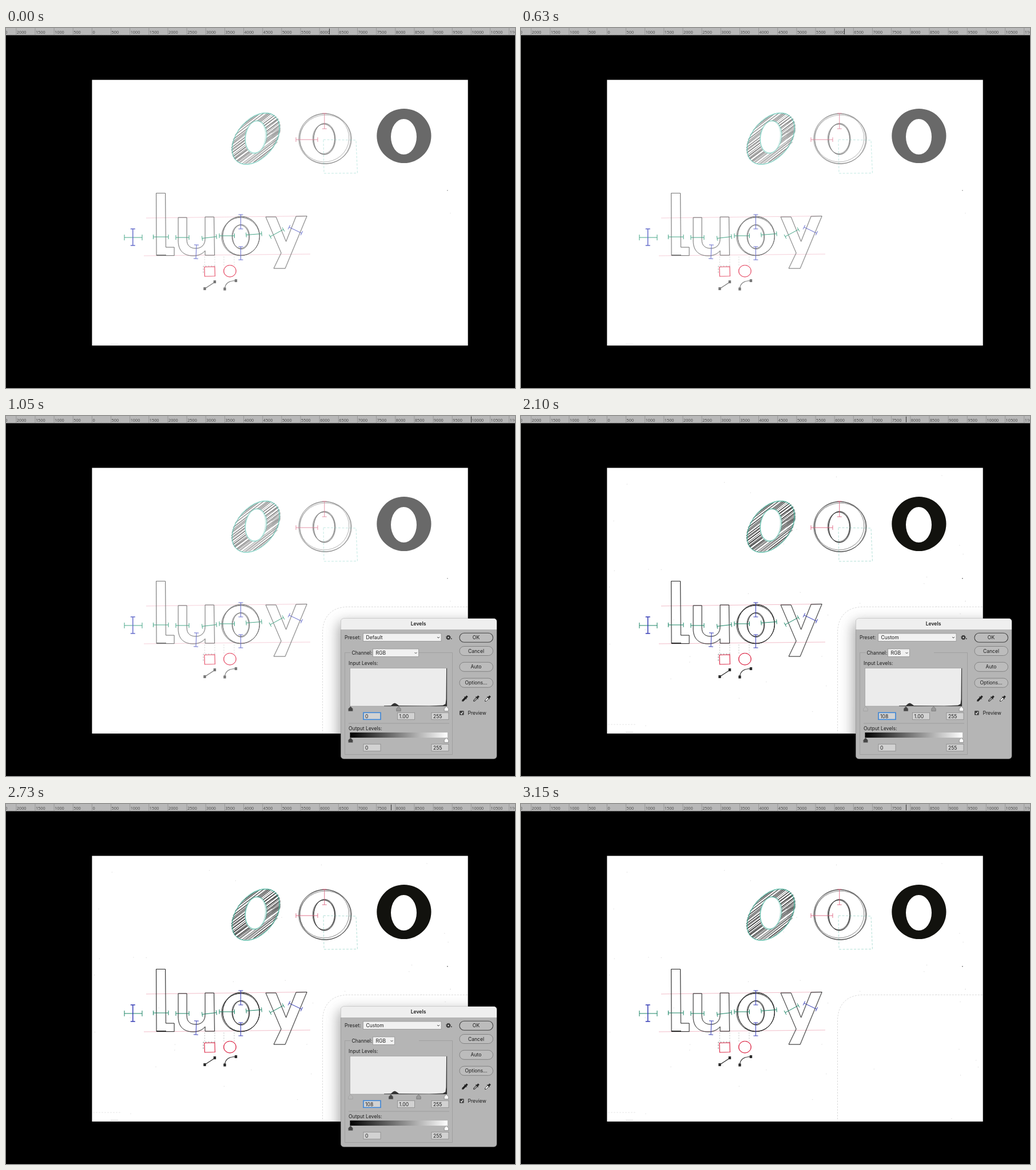
An HTML page for the animation above (4.2 s loop, 890x629 px).

```html
<!DOCTYPE html>
<html lang="en">
<head>
<meta charset="utf-8">
<title>Sketch levels</title>
<style>
html, body { margin: 0; width: 100%; height: 100%; overflow: hidden; background: #000; }
svg { display: block; width: 890px; height: 629px; font-family: Inter, "Open Sans", sans-serif; }
svg { --ink: #787878; --fill: #696969; --teal: #6fcbbb; --green: #45a586; --blue: #666dcc; --rose: #dc7890; --guide: #f3c3d0; --red: #e75870; --faint: #cfcfcf; }
svg.dark { --ink: #2a2a2a; --fill: #12120e; --teal: #46b29c; --green: #168263; --blue: #343bb5; --rose: #d94f70; --guide: #eeabba; --red: #dc2b49; --faint: #b4b4b4; }
.ui { font-size: 8.6px; fill: #1c1c1c; }
</style>
</head>
<body>
<svg id="stage" viewBox="0 0 890 629" fill="none" xmlns="http://www.w3.org/2000/svg"></svg>
<script>
const stage = document.getElementById("stage");
const HOLD = 1050;

let seed = 11;
const rand = () => (seed = (seed * 16807) % 2147483647) / 2147483647;
const jit = n => (rand() - 0.5) * 2 * n;

const line = (x1, y1, x2, y2, color, w = 0.9, extra = "") =>
  `<path d="M${x1} ${y1}L${x2} ${y2}" stroke="${color}" stroke-width="${w}" ${extra}/>`;
const path = (d, color, w = 1, extra = "") =>
  `<path d="${d}" stroke="${color}" stroke-width="${w}" ${extra}/>`;
const rect = (x, y, w, h, fill, extra = "") =>
  `<rect x="${x}" y="${y}" width="${w}" height="${h}" fill="${fill}" ${extra}/>`;
const text = (x, y, s, extra = "") => `<text class="ui" x="${x}" y="${y}" ${extra}>${s}</text>`;
const oval = (cx, cy, rx, ry, color, w = 0.8, turn = 0) =>
  `<ellipse cx="${cx}" cy="${cy}" rx="${rx}" ry="${ry}" stroke="${color}" stroke-width="${w}" transform="rotate(${turn} ${cx} ${cy})"/>`;

// several loose pencil turns around the same oval
function turns(n, cx, cy, rx, ry, color, spread, w, turn = 0) {
  let s = "";
  for (let i = 0; i < n; i++)
    s += oval(cx + jit(spread), cy + jit(spread), rx + jit(spread), ry + jit(spread), color, w, turn + jit(4));
  return s;
}

const pencil = d =>
  path(d, "var(--ink)", 0.9, 'stroke-linejoin="round"') +
  path(d, "var(--ink)", 0.6, 'transform="translate(.7 .4)" opacity=".55"');

// a measuring bar with a short cap at each end
function gauge(x1, y1, x2, y2, color, cap = 4, w = 1) {
  const len = Math.hypot(x2 - x1, y2 - y1);
  const nx = -(y2 - y1) / len * cap, ny = (x2 - x1) / len * cap;
  const end = (x, y) => `M${x - nx} ${y - ny}L${x + nx} ${y + ny}`;
  return path(`M${x1} ${y1}L${x2} ${y2}` + end(x1, y1) + end(x2, y2), color, w);
}

function ruler() {
  let s = rect(0, 0, 890, 12.5, "#b8b8b8");
  for (let v = -2500; v <= 11000; v += 500) {
    const x = 150.4 + v * 0.0663;
    s += line(x, 0, x, 12.5, "#8c8c8c", 0.7);
    for (let i = 1; i < 10; i++)
      s += line(x + i * 3.315, i === 5 ? 10 : 11, x + i * 3.315, 12.5, "#a4a4a4", 0.4);
    s += `<text x="${x + 1}" y="9.6" font-size="7.3" font-family="Open Sans, sans-serif" fill="#4a4a4a">${Math.abs(v)}</text>`;
  }
  return s;
}

function hatchedO() {
  let s = `<clipPath id="slant"><ellipse cx="437" cy="193" rx="52" ry="33.5" transform="rotate(-47 437 193)"/></clipPath><g clip-path="url(#slant)">`;
  for (let y = 100; y < 290; y += 2.5)
    s += line(387, y + 38 + jit(1.6), 488, y - 38 + jit(1.6), "var(--ink)", 0.6 + rand() * 0.6);
  s += "</g>";
  s += `<ellipse cx="436.5" cy="191" rx="18.5" ry="28.5" fill="#fff" transform="rotate(10 436.5 191)"/>`;
  // strokes that overshoot the right edge
  for (let i = 0; i < 9; i++) {
    const y = 160 + i * 5;
    s += line(466 + jit(2), y + 8, 479 - Math.abs(i - 3) * 0.8, y - 1, "var(--ink)", 0.6);
  }
  return s + turns(2, 437, 193, 51.5, 33, "var(--teal)", 0.7, 0.7, -47) +
    turns(3, 436.5, 191, 18, 28.5, "var(--teal)", 0.9, 0.5, 10);
}

function outlinedO() {
  return turns(4, 557.8, 193, 45, 43.5, "var(--ink)", 1.5, 0.55) +
    turns(4, 556, 194, 18.6, 26.5, "var(--ink)", 0.8, 0.65) +
    gauge(507, 195, 545, 195, "var(--rose)", 4, 0.8) +
    gauge(556.8, 149, 556.8, 176, "var(--rose)", 4, 0.8) +
    path("M555 195L612 196L614.5 253.5L556 254Z", "var(--teal)", 0.7, 'stroke-dasharray="4 2.5" opacity=".6"');
}

function solidO() {
  return `<path fill="var(--fill)" fill-rule="evenodd" d="M648.3 188.5a47.6 47.5 0 1 0 95.2 0a47.6 47.5 0 1 0 -95.2 0ZM673 190a22.5 31 0 1 0 45 0a22.5 31 0 1 0 -45 0Z"/>`;
}

function lettering() {
  const g = "var(--green)", b = "var(--blue)", k = "var(--ink)";
  return line(245, 332, 526, 328.5, "var(--guide)", 0.8) +
    line(241, 398, 532, 395, "var(--guide)", 0.8) +
    pencil("M262.5 288.5H278.5L279.3 383H294V397.5H263Z") +
    line(263, 397, 280, 397, k, 2) +
    pencil("M301 331V372C301 390 312 398 327 398C337 398 344 394 348 389V397H364.5L363.5 330H348V368C348 380 340 385 332 385C322 385 316 380 316 370V331Z") +
    turns(3, 410.5, 364, 32.5, 34, k, 0.8, 0.9) +
    turns(3, 410.5, 364.5, 15, 21, k, 0.9, 0.75) +
    pencil("M454 330L472 330L489.5 373L507 329L526 328.5L488 420H468L481 393Z") +
    gauge(207, 366, 238, 366, g, 5) + gauge(221.8, 351, 221.8, 380, b, 4, 1.5) +
    gauge(257.5, 365, 284, 365, g) + gauge(297, 366, 320, 366, g) +
    gauge(343, 367.5, 368, 364.5, g) + gauge(333, 379, 332, 403, b) +
    gauge(373, 363, 399.5, 363, g) + gauge(420, 361.5, 447, 359.5, g) +
    gauge(410.5, 326, 410.5, 351, b) + gauge(410.5, 382, 410.5, 405, b) +
    gauge(462, 364.5, 485, 352, g) + gauge(495, 348, 517, 358.5, b);
}

function shapes() {
  const k = "var(--ink)", r = "var(--red)";
  let s = "";
  for (const x of [347.5, 365, 381, 399])
    s += line(x, 399, x, 417, "var(--faint)", 0.7, 'stroke-dasharray="2.5 2"');
  s += path("M345 428V416H366", k, 0.7, 'stroke-dasharray="3 2" opacity=".7"');
  s += path("M347 417.5L365 417L365.5 433.5L347.5 434Z", r, 1.2);
  s += turns(2, 391.8, 424.5, 10.7, 10.2, r, 0.4, 0.9);
  s += path("M347.5 455.5L365 444M382.5 456C383 446 390 441.5 402 441.5", k, 1.2);
  for (const [x, y] of [[347.5, 455.5], [365, 443.5], [382.5, 456], [402, 441.5]])
    s += rect(x - 2.2, y - 2.5, 4.4, 5, k);
  return s;
}

function specks() {
  let s = "";
  for (let i = 0; i < 45; i++)
    s += rect(154 + rand() * 645, 95 + rand() * 455, 1.1, 1, "#d2d2d2");
  return s + line(152, 539, 202, 539, "#ddd", 0.7, 'stroke-dasharray="3 2"');
}

function select(id, x, y, w, label) {
  return rect(x, y, w, 13.4, "#f1f1f1", `id="${id}Box" stroke="#8c8c8c" stroke-width=".7"`) +
    text(x + 5, y + 9.8, label, `id="${id}Text"`) +
    path("M-2 -1L0 1L2 -1", "#333", 0.9, `id="${id}Arrow" transform="translate(${x + w - 5} ${y + 7})"`);
}

const field = (x, y, value, id = "") =>
  rect(x, y, 30, 12, "#d2d2d2", 'stroke="#8a8a8a" stroke-width=".8"') +
  text(x + 3, y + 9.2, value, id);

function button(y, label, strong) {
  return rect(793, y, 58.5, 16, "#bcbcbc", `rx="8" stroke="${strong ? "#444" : "#777"}" stroke-width="${strong ? 1.1 : 0.8}"`) +
    text(822, y + 11.1, label, 'text-anchor="middle"');
}

const knob = (id, x, y, fill) =>
  `<path id="${id}" d="M0 0L3.7 4V8H-3.7V4Z" fill="${fill}" stroke="#666" stroke-width=".6" transform="translate(${x} ${y})"/>`;

const dropper = (x, tip) =>
  `<g transform="translate(${x} 494) rotate(45)"><rect x="-1.4" y="-2" width="2.8" height="7" fill="${tip}" stroke="#222" stroke-width=".8"/><path d="M-1 5L0 7L1 5ZM-3 -2.8H3V-1.5H-3ZM-1.7 -6.5H1.7V-2H-1.7Z" fill="#222"/></g>`;

const gear = () =>
  oval(773.5, 387, 2.4, 2.4, "#222", 1.5) +
  `<circle cx="773.5" cy="387" r="3.7" stroke="#222" stroke-width="1.1" stroke-dasharray="1.45 1.45"/>` +
  rect(778, 388.5, 1.6, 1.4, "#222");

function dialog() {
  return rect(585.5, 354, 272.5, 245, "#b5b5b5", 'rx="5" stroke="#8a8a8a" stroke-width=".6"') +
    `<path d="M585.5 373V359a5 5 0 0 1 5 -5H853a5 5 0 0 1 5 5V373Z" fill="#efefef"/>` +
    text(721, 366, "Levels", 'text-anchor="middle" font-weight="600"') +
    text(592, 390, "Preset:") + select("preset", 624.5, 380, 136.5, "Default") + gear() +
    path("M603 413.5H592.5V591.5H780.5V413.5H722", "#9b9b9b", 0.8) +
    text(604.5, 416.8, "Channel:") + select("channel", 641.5, 407, 80, "RGB") +
    text(599, 435, "Input Levels:") +
    rect(601.5, 440.5, 169.5, 66.5, "#ececec", 'stroke="#999" stroke-width=".7"') +
    `<path d="M661 507V506.3L673 506L677 502.5L680 501.4L683 503L687 506L740 506.5L764 505.5L768.5 503L769.5 495L770 441H771V507Z" fill="#333"/>` +
    knob("ghost", 602.5, 507.5, "#bdbdbd") +
    knob("black", 602.5, 507.5, "#454545") + knob("mid", 686.5, 507.5, "#999") + knob("white", 770, 507.5, "#fff") +
    field(625, 518.3, "0", 'id="low"') + field(684.5, 518.3, "1.00") + field(744, 518.3, "255") +
    rect(625, 518.3, 30, 12, "none", 'stroke="#3a87dc" stroke-width="1.5"') +
    line(599, 537, 775, 537, "#999", 0.8) +
    text(599, 548.8, "Output Levels:") +
    rect(601.5, 553, 170.5, 9, "url(#ramp)") +
    knob("outLow", 602.5, 562.3, "#454545") + knob("outHigh", 770, 562.3, "#fff") +
    field(625, 573.3, "0") + field(744, 573.3, "255") +
    button(379.3, "OK", true) + button(402.5, "Cancel") + button(430.3, "Auto") + button(458.2, "Options...") +
    dropper(802, "#222") + dropper(822, "#999") + dropper(842, "#fff") +
    rect(793, 515, 7.6, 7.6, "#3f3f3f", 'rx="1.2"') + path("M794.8 519L796.4 520.8L799 516.8", "#fff", 1.1) +
    text(807.5, 521.8, "Preview");
}

stage.innerHTML = `
<defs>
  <linearGradient id="ramp"><stop stop-color="#000"/><stop offset="1" stop-color="#fff"/></linearGradient>
  <filter id="blur" x="-20%" y="-20%" width="140%" height="140%"><feGaussianBlur stdDeviation="11"/></filter>
  <clipPath id="sheet"><rect x="150.4" y="90.6" width="657.3" height="464.2"/></clipPath>
</defs>
${rect(0, 0, 890, 629, "#000")}
${ruler()}
${rect(150.4, 90.6, 657.3, 464.2, "#fff")}
<g clip-path="url(#sheet)">
  <g id="specks">${specks()}</g>
  ${hatchedO()}${outlinedO()}${solidO()}${lettering()}${shapes()}
  ${rect(771.2, 283.2, 1.4, 1.2, "var(--ink)")}${rect(776.5, 323, 1.2, 0.8, "var(--faint)")}
  ${line(183, 552.5, 196, 552.5, "var(--faint)", 0.6)}
  <g id="shadow">${rect(580, 359, 284, 260, "#777", 'rx="12" filter="url(#blur)" opacity=".6"')}</g>
  <path id="halo" d="M553.5 556V378C554 350 570 333.5 598 333.5H809" stroke="#d2d2d2" stroke-width=".8" stroke-dasharray="3 2"/>
</g>
<path id="cursor" d="M0 1V11" stroke="#333" stroke-width="1"/>
<g id="dialog">${dialog()}</g>`;

const el = id => document.getElementById(id);
const show = (id, on) => el(id).setAttribute("display", on ? "inline" : "none");
const moveTo = (id, x, y) => el(id).setAttribute("transform", `translate(${x} ${y})`);
const cursorX = [565.5, 813.5, 673.5, 673.5];
el("ghost").setAttribute("opacity", 0.35);
let last = -1;

function draw(time) {
  const step = Math.floor(time / HOLD) % 4;
  if (step === last) return;
  last = step;
  const dark = step > 1, open = step === 1 || step === 2;
  stage.classList.toggle("dark", dark);
  show("specks", dark);
  show("dialog", open);
  show("shadow", open);
  show("halo", step > 0);
  show("ghost", dark);
  moveTo("cursor", cursorX[step], 0);
  moveTo("black", dark ? 673 : 602.5, 507.5);
  moveTo("mid", dark ? 721.5 : 686.5, 507.5);
  el("low").textContent = dark ? "108" : "0";
  el("presetText").textContent = dark ? "Custom" : "Default";
  el("channelBox").setAttribute("width", dark ? 38 : 80);
  moveTo("channelArrow", dark ? 674.5 : 716.5, 414);
}

function tick() {
  draw(performance.now());
  requestAnimationFrame(tick);
}
tick();
</script>
</body>
</html>
```
